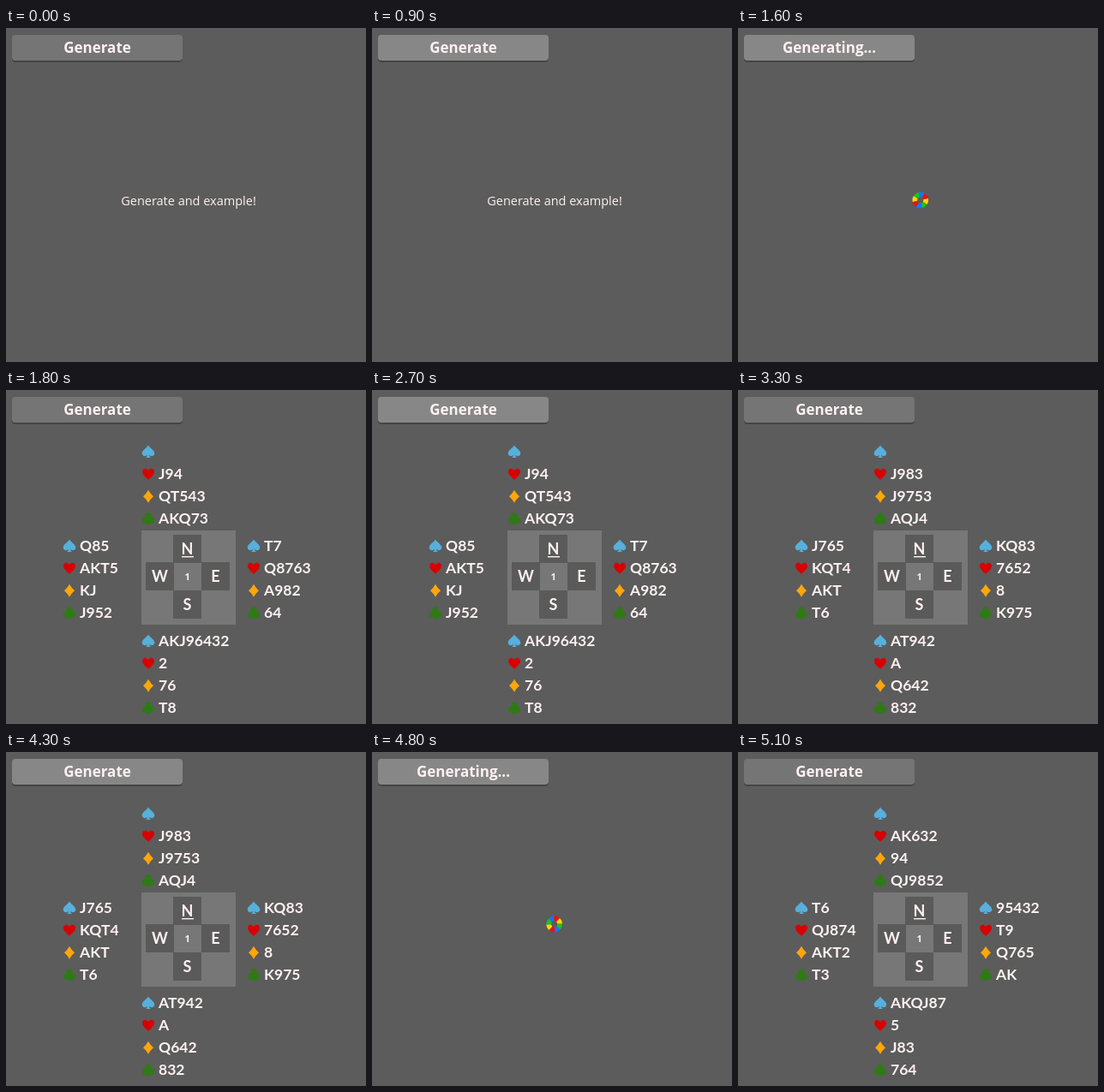
An HTML page that plays this animation: 420 by 390 pixels, repeating every 6500 ms.

```html
<!DOCTYPE html>
<html lang="en">
<head>
<meta charset="utf-8">
<title>Deal generator</title>
<style>
  html, body { margin: 0; width: 100%; height: 100%; overflow: hidden; background: #5c5c5c; }
  svg { display: block; width: 420px; height: 390px; }
  text { fill: #fff0f0; }
  .button { font: 700 17px "Open Sans", sans-serif; text-anchor: middle; }
  .hint { font: 400 14.5px "Open Sans", sans-serif; text-anchor: middle; }
  .cards { font: 700 17.5px Lato, sans-serif; }
  .seat { font: 700 18px Lato, sans-serif; text-anchor: middle; }
  .board { font: 700 11px "Open Sans", sans-serif; text-anchor: middle; }
</style>
</head>
<body>
<svg viewBox="0 0 420 390">
  <defs>
    <path id="suit0" fill="#57b0dc" d="M0-7.5C2-4.2 7.3-1.5 7.3 2C7.3 5.4 3 6.2 1 3.8Q1.2 6 3 7H-3Q-1.2 6-1 3.8C-3 6.2-7.3 5.4-7.3 2C-7.3-1.5-2-4.2 0-7.5Z"/>
    <path id="suit1" fill="#d80000" d="M0 7C-2 4.5-7 1-7-2.6C-7-7-1.7-7.8 0-3.8C1.7-7.8 7-7 7-2.6C7 1 2 4.5 0 7Z"/>
    <path id="suit2" fill="#ffa60a" d="M0-7.5Q2.5-3 6 0Q2.5 3 0 7.5Q-2.5 3-6 0Q-2.5-3 0-7.5Z"/>
    <g id="suit3" fill="#2f7a16">
      <circle cy="-3.4" r="3.6"/><circle cx="-3.7" cy="1.9" r="3.6"/><circle cx="3.7" cy="1.9" r="3.6"/>
      <path d="M-1.5-1H1.5Q1 5.5 3 6.8H-3Q-1 5.5-1.5-1Z"/>
    </g>
  </defs>
  <rect width="420" height="390" fill="#5c5c5c"/>
  <rect x="7" y="10" width="199" height="30" rx="4" fill="#454545"/>
  <rect id="face" x="7" y="8" width="199" height="30" rx="4"/>
  <text id="label" class="button" x="106.5" y="28.5"></text>
  <text id="hint" class="hint" x="213" y="207">Generate and example!</text>
  <g id="spinner"></g>
  <g id="deal">
    <rect x="158" y="164" width="110" height="110" fill="#777"/>
    <g id="compass"></g>
    <text class="board" x="211.7" y="222">1</text>
    <g id="hands"></g>
  </g>
</svg>
<script>
const LOOP = 6500, STEP = 100;
const $ = id => document.getElementById(id);

// Hands in the order north, west, east, south; suits from spades to clubs.
const DEALS = [
  ["|J94|QT543|AKQ73", "Q85|AKT5|KJ|J952", "T7|Q8763|A982|64", "AKJ96432|2|76|T8"],
  ["|J983|J9753|AQJ4", "J765|KQT4|AKT|T6", "KQ83|7652|8|K975", "AT942|A|Q642|832"],
  ["|AK632|94|QJ9852", "T6|QJ874|AKT2|T3", "95432|T9|Q765|AK", "AKQJ87|5|J83|764"]
];
const PLACES = [[166, 72], [74, 182], [289, 182], [166, 293]];

// Start time, view, lit button; a numeric view is a deal.
const SCENES = [
  [0, "hint", false], [900, "hint", true], [1300, "busy", true],
  [1800, 0, false], [2700, 0, true], [2900, "busy", true],
  [3300, 1, false], [4300, 1, true], [4600, "busy", true],
  [5100, 2, false]
];

$("compass").innerHTML = [["N", 195, 169], ["W", 163, 201], ["E", 228, 201], ["S", 195, 234]]
  .map(([seat, x, y]) => `<rect x="${x}" y="${y}" width="33" height="33" fill="#5a5a5a"/>
    <text class="seat" x="${x + 16.5}" y="${y + 23}">${seat}</text>`).join("") +
  '<rect x="205" y="194" width="14" height="1.4" fill="#fff0f0"/>';

const onCircle = (radius, degrees) => {
  const a = degrees * Math.PI / 180;
  return `${radius * Math.sin(a)} ${-radius * Math.cos(a)}`;
};

const WHEEL = ["#1478ff", "#f01010", "#ffd800", "#20c020"];
$("spinner").innerHTML = Array.from({ length: 8 }, (_, i) => {
  const from = i * 45 - 12, to = from + 45;
  return `<path fill="${WHEEL[i % 4]}" d="M${onCircle(9.4, from)}A9.4 9.4 0 0 1 ${onCircle(9.4, to)}
    L${onCircle(3.6, to)}A3.6 3.6 0 0 0 ${onCircle(3.6, from)}Z"/>`;
}).join("");

function drawHands(deal) {
  $("hands").innerHTML = deal.map((hand, seat) => {
    const [x, top] = PLACES[seat];
    return hand.split("|").map((cards, suit) => {
      const y = top + suit * 26.1;
      return `<use href="#suit${suit}" x="${x}" y="${y}"/>
        <text class="cards" x="${x + 12}" y="${y + 6}">${cards}</text>`;
    }).join("");
  }).join("");
}

const show = (id, visible) => $(id).setAttribute("display", visible ? "inline" : "none");
let current;

function enter(scene) {
  const [, view, lit] = scene;
  const dealt = typeof view === "number";
  $("face").setAttribute("fill", lit ? "#878787" : "#757575");
  $("label").textContent = view === "busy" ? "Generating..." : "Generate";
  show("hint", view === "hint");
  show("spinner", view === "busy");
  show("deal", dealt);
  if (dealt) drawHands(DEALS[view]);
  current = scene;
}

function frame() {
  const time = performance.now() % LOOP;
  const scene = SCENES.findLast(([start]) => start <= time);
  if (scene !== current) enter(scene);
  if (scene[1] === "busy") {
    const ticks = Math.floor((time - scene[0]) / STEP);
    $("spinner").setAttribute("transform", `translate(212.7 201) rotate(${(ticks - 3) * 36})`);
  }
  requestAnimationFrame(frame);
}
frame();
</script>
</body>
</html>
```
